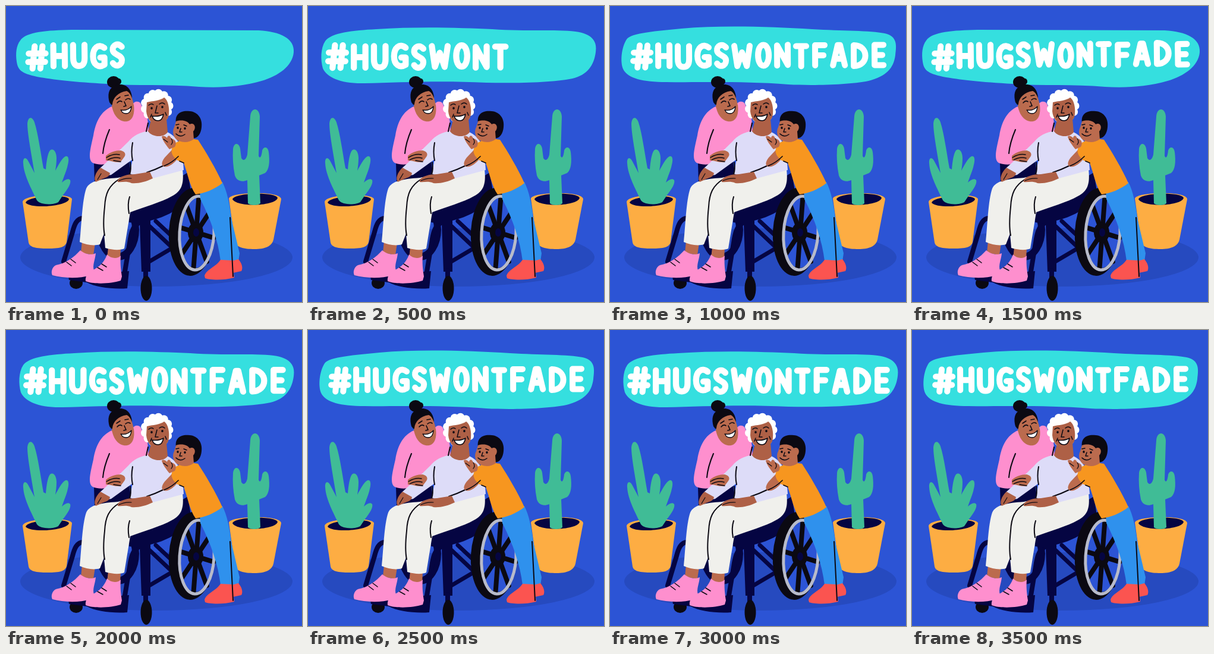
An HTML page with a canvas that plays this animation: 498x498 px, repeating every 4000 ms.

```html
<!DOCTYPE html>
<html lang="en">
<head>
<meta charset="utf-8">
<title>Family care</title>
<style>
html, body { margin: 0; width: 100%; height: 100%; overflow: hidden; background: #2c54d5; }
canvas { display: block; }
</style>
</head>
<body>
<canvas id="stage" width="498" height="498" role="img" aria-label="#HUGSWONTFADE"></canvas>
<script>
const ctx = document.getElementById('stage').getContext('2d');

const BLUE = '#2c54d5', SHADE = '#264abf', TEAL = '#35dfdf', NAVY = '#050542', BLACK = '#0b0912',
  POT = '#fdad43', GREEN = '#40bc96', SKIN = '#bb6b4e', DARK_SKIN = '#ae6046', PINK = '#fe8fce',
  LILAC = '#dddcf8', WHITE = '#f0f0ec', ORANGE = '#f7961f', JEANS = '#2f91ed', RED = '#fb5450', GREY = '#b8bbca';

function fill(color, d) {
  ctx.fillStyle = color;
  ctx.fill(new Path2D(d));
}

function line(color, width, d) {
  ctx.strokeStyle = color;
  ctx.lineWidth = width;
  ctx.stroke(new Path2D(d));
}

function oval(color, x, y, rx, ry, angle = 0) {
  ctx.fillStyle = color;
  ctx.beginPath();
  ctx.ellipse(x, y, rx, ry, angle, 0, 7);
  ctx.fill();
}

function ring(color, width, x, y, rx, ry, angle = 0) {
  ctx.strokeStyle = color;
  ctx.lineWidth = width;
  ctx.beginPath();
  ctx.ellipse(x, y, rx, ry, angle, 0, 7);
  ctx.stroke();
}

// Hand lettering: [width, centre line] on a 45 px tall box
const GLYPHS = {
  '#': [37, 'M15 5L11 42M28 5L24 42M5 17H33M4 31H32'],
  H: [29, 'M5 5V40M24 5V40M5 23H24'],
  U: [29, 'M5 5V27Q5 40 14.5 40T24 27V5'],
  G: [29, 'M24 9C14 1 5 9 5 23C5 37 14 43 24 37V25H17'],
  S: [25, 'M20 9C13 1 4 7 5 14C6 23 20 22 20 31C20 41 9 43 5 36'],
  W: [36, 'M5 5L10 39L18 16L26 39L31 5'],
  O: [28, 'M14 5C2 5 2 40 14 40C26 40 26 5 14 5Z'],
  N: [28, 'M5 40V6L23 39V5'],
  T: [27, 'M5 6H22M13.5 6V40'],
  F: [27, 'M6 40V6H22M6 23H20'],
  A: [30, 'M5 40L13 6H17L25 40M9 29H21'],
  D: [31, 'M6 5V40C32 40 32 5 6 5Z'],
  E: [26, 'M21 6H6V40H21M6 23H19']
};

const POSES = {
  high: {
    x: 35, y: 62, scale: 1, tilt: -.005,
    blob: 'M28 56C36 45 80 42 120 38C190 32 270 35 340 39C390 42 438 41 462 46C484 51 482 66 480 83C477 105 465 118 435 126C400 133 340 134 300 132C220 126 150 129 95 128C55 128 30 122 22 106C17 94 19 70 28 56Z'
  },
  wide: {
    x: 30, y: 62, scale: 1.025, tilt: 0,
    blob: 'M29 59C39 45 75 41 115 39C190 34 260 37 310 39C370 43 415 39 450 43C478 47 487 59 484 78C481 100 470 116 445 122C410 129 350 130 300 129C220 125 150 129 95 130C55 131 32 120 25 105C21 91 21 71 29 59Z'
  },
  low: {
    x: 33, y: 62, scale: 1.01, tilt: -.012,
    blob: 'M24 58C34 43 70 41 110 40L425 41C462 43 486 55 484 78C482 101 458 118 430 126C395 136 360 138 325 136C270 131 220 135 170 131C115 128 80 124 52 119C25 113 20 107 18 94C16 80 17 67 24 58Z'
  }
};

const FULL = '#HUGSWONTFADE';
const STEPS = [
  ['low', 5], ['wide', 9], ['high', 13], ['low', 13],
  ['wide', 13], ['high', 13], ['wide', 13], ['high', 13]
];

function drawBanner(pose, count) {
  fill(TEAL, pose.blob);
  ctx.save();
  ctx.translate(pose.x, pose.y);
  ctx.rotate(pose.tilt);
  ctx.scale(pose.scale, pose.scale);
  [...FULL.slice(0, count)].forEach((char, i) => {
    const [width, d] = GLYPHS[char];
    const lift = Math.sin(i * 2.1 + pose.x);
    ctx.translate(0, lift);
    line('#fff', 10, d);
    ctx.translate(width + 4, -lift);
  });
  ctx.restore();
}

function drawPlants() {
  fill(POT, 'M28 330C27 316 110 314 111 325L102 397C100 406 90 408 70 408C50 408 40 406 38 398Z');
  fill(NAVY, 'M33 331C35 319 104 316 106 325C103 337 43 342 33 331Z');
  fill(GREEN, 'M52 327C44 310 30 285 29 265C28 254 34 253 38 262L48 281C43 250 36 215 36 198C37 186 44 185 48 196C54 215 58 245 63 273L67 275C68 262 70 248 74 243C80 238 85 246 85 256C85 264 84 270 83 277C88 268 94 256 100 253C106 251 106 260 104 267C102 277 98 285 94 297C99 292 105 289 108 293C110 298 104 308 96 318L88 330C80 335 58 335 52 327Z');
  fill(POT, 'M375 324C376 313 462 310 463 325L450 393C447 405 435 409 418 409C400 409 387 406 385 396Z');
  fill(NAVY, 'M381 325C384 314 454 312 457 323C453 337 388 339 381 325Z');
  fill(GREEN, 'M407 332L406 293C396 297 388 294 385 285C382 270 381 255 382 240C384 229 392 230 394 240L396 256C400 262 404 258 406 250L411 186C412 170 426 170 427 186L425 252C427 258 430 254 431 243C434 235 441 237 442 246C444 262 443 275 436 281L426 285L428 332C424 336 411 336 407 332Z');
}

function drawChair() {
  fill(NAVY, 'M148 264L207 262L212 290L149 298Z');
  ring(NAVY, 12, 188, 376, 30, 46);
  line(NAVY, 8, 'M130 357C119 357 115 368 112 380L97 430M222 366C212 372 210 385 208 398L197 465');
  oval(BLACK, 118, 466, 11, 10);
  fill(NAVY, 'M105 454L207 446L204 475C180 477 150 473 136 465L106 461Z');
  line(NAVY, 7, 'M241 370L277 404M241 430L280 407M252 362L282 390');
  fill(NAVY, 'M207 340L306 280L312 318C292 344 268 355 243 361L243 447H228L225 366L207 364Z');
  line(NAVY, 8, 'M235 445V462');
  oval(BLACK, 236, 475, 9.5, 21);
  oval(BLACK, 313, 380, 39, 74, .06);
  oval(BLUE, 321, 381, 29, 60, .06);
  for (let i = 0; i < 4; i++) {
    const a = i * Math.PI / 4 + .15, dx = 30 * Math.cos(a), dy = 61 * Math.sin(a);
    line(BLACK, 8, `M${320 - dx} ${381 - dy}L${320 + dx} ${381 + dy}`);
  }
  oval(BLACK, 319, 381, 13, 17);
  oval(NAVY, 320, 381, 5, 7);
  ring(GREY, 5, 321, 382, 29, 62, .06);
}

function drawWoman() {
  fill(PINK, 'M178 169C160 177 151 194 147 218C142 240 137 258 146 264C160 269 172 267 190 258L240 212L238 188L226 163C218 157 212 164 206 176Z');
  fill(SKIN, 'M178 168C181 186 192 196 204 194C213 192 217 182 215 166Z');
  oval(BLACK, 181, 128, 11, 10);
  oval(BLACK, 190, 127, 4, 5);
  fill(BLACK, 'M174 162C169 144 176 134 190 132C204 131 211 141 212 154L207 170L177 166Z');
  fill(SKIN, 'M179 165C180 154 189 145 203 143C211 146 216 164 215 174C213 184 206 188 198 186C188 183 182 177 178 169Z');
  line(BLACK, 1.6, 'M187 163Q191 158 195 161M201 158Q205 154 209 157M186 157L192 153M200 151L206 150M199 161L202 168L198 169');
  fill('#fff', 'M194 176Q204 176 211 169Q210 180 202 181Q196 181 194 176Z');
  line(BLACK, 1.3, 'M193 175Q204 177 211 169Q210 181 202 181Q196 181 194 176');
  line(BLACK, 2, 'M174 208C168 222 164 236 163 248');
}

function drawElder() {
  // Trousers, shoes and ankles
  fill(SKIN, 'M128 395L150 399L147 419L126 415ZM172 406L193 407L192 427L170 424Z');
  fill(PINK, 'M125 411C132 417 142 420 151 416C150 427 145 436 148 445L143 453C122 459 97 458 78 453C75 447 78 439 84 436C101 433 115 422 125 411Z');
  fill(PINK, 'M170 418C176 425 188 426 193 420C192 433 193 442 195 455L193 462C175 468 145 468 134 463C133 455 137 449 144 445C157 440 166 430 170 418Z');
  line(BLACK, 1.5, 'M102 431L110 437M109 426L117 432M154 440L163 445M161 434L169 439');
  fill(WHITE, 'M188 289C160 291 141 294 135 307C128 327 127 370 124 397C135 402 148 404 158 401L165 383L167 407C180 411 193 411 199 408L209 347C232 338 262 330 279 320C295 312 300 300 297 275L240 278Z');
  line(BLACK, 2, 'M191 291C173 302 167 315 166 338C164 356 163 371 166 386M208 321Q204 333 207 349');

  fill(LILAC, 'M241 210C226 212 214 218 206 228C190 244 174 258 158 273C163 282 170 286 177 284L213 258L208 282C219 286 238 290 247 290L299 276L297 250C294 230 284 216 268 211Z');
  line(BLACK, 2, 'M213 230Q210 246 213 260M209 263Q211 275 208 283M237 280Q252 275 264 269');
  fill(DARK_SKIN, 'M245 188L270 190L272 212C266 222 246 221 239 211Z');
  line(BLACK, 2, 'M239 197L236 211');
  // Curly hair
  oval('#fff', 254, 168, 24, 26);
  for (let i = 0; i < 13; i++) {
    const a = i * Math.PI * 2 / 13;
    oval('#fff', 254 + 20.5 * Math.cos(a), 168 + 21.5 * Math.sin(a), 7, 7);
  }
  fill(DARK_SKIN, 'M237 162C246 160 260 159 266 154C274 159 276 177 273 187C269 196 260 200 253 199C243 197 237 188 236 177Z');
  line(BLACK, 1.5, 'M240 167Q244 163 248 166M258 165Q263 161 267 165M254 168L251 180H256M245 182L243 187M268 179L270 184');
  oval(BLACK, 245, 172, 1.8, 2);
  oval(BLACK, 263, 170, 1.8, 2);
  fill('#fff', 'M246 185Q256 187 264 182Q263 192 256 193Q248 193 246 185Z');
  line(BLACK, 1.5, 'M245 185Q256 187 265 182Q263 193 256 193Q248 193 246 185');

  // Hands around the lap
  fill(DARK_SKIN, 'M159 272L175 281C174 289 164 289 160 292L151 296C147 291 150 280 159 272Z');
  fill(DARK_SKIN, 'M188 293C192 286 204 283 217 283L242 279L247 290C235 296 222 299 211 298C202 294 195 297 188 296Z');
  line(BLACK, 1.2, 'M190 294Q200 289 211 290M154 292L160 282');
  fill(SKIN, 'M168 252C175 246 184 243 193 243C201 245 202 250 199 254L193 262C185 265 176 259 168 260Z');
  line(BLACK, 1.4, 'M169 255Q180 248 191 250M171 259Q182 253 192 256M181 260L193 262');
}

function drawBoy() {
  fill(JEANS, 'M326 312L364 296C372 312 376 332 379 357L393 416L391 430L361 429C357 395 345 360 327 325Z');
  fill(RED, 'M380 429L391 426C397 433 399 441 396 446L382 449Z');
  fill(RED, 'M334 454C337 443 352 440 361 427L380 428L384 457C366 462 342 461 335 458Z');
  line(BLACK, 2, 'M377 356L382 455');
  fill(SKIN, 'M283 238L289 257C281 266 273 272 265 270C260 267 263 260 267 255Z');
  fill(ORANGE, 'M284 231C294 224 308 222 323 225C336 245 354 275 364 298C350 309 334 315 319 317C309 303 306 283 299 264L289 260C281 254 277 247 279 240Z');
  line(BLACK, 1.7, 'M266 269Q279 264 290 253M292 261L299 264');
  fill(BLACK, 'M286 196C284 182 294 175 309 177C323 178 331 190 329 204C328 216 321 225 311 222L304 203Z');
  fill(SKIN, 'M286 194C296 191 305 193 309 199C317 195 321 205 315 211L316 224C308 230 299 230 291 227C281 223 279 211 283 204Z');
  oval(BLACK, 289, 205, 1.7, 2);
  oval(BLACK, 301, 206, 1.7, 2);
  line(BLACK, 1.5, 'M286 200L291 199M299 200L304 202M294 206L292 212H296M286 215Q293 222 301 216');
  fill(SKIN, 'M271 222C272 217 276 217 278 223C285 224 288 230 284 237L275 241C270 235 264 227 262 220C264 217 268 219 271 222Z');
  line(BLACK, 1.2, 'M265 224L272 229M278 223Q282 229 278 233');
}

function frame(now) {
  const [pose, count] = STEPS[Math.floor(now % 4000 / 500)];
  ctx.lineCap = ctx.lineJoin = 'round';
  ctx.fillStyle = BLUE;
  ctx.fillRect(0, 0, 498, 498);
  oval(SHADE, 253, 423, 229, 49);
  drawBanner(POSES[pose], count);
  drawPlants();
  drawChair();
  drawWoman();
  drawElder();
  drawBoy();
  requestAnimationFrame(frame);
}

requestAnimationFrame(frame);
</script>
</body>
</html>
```
